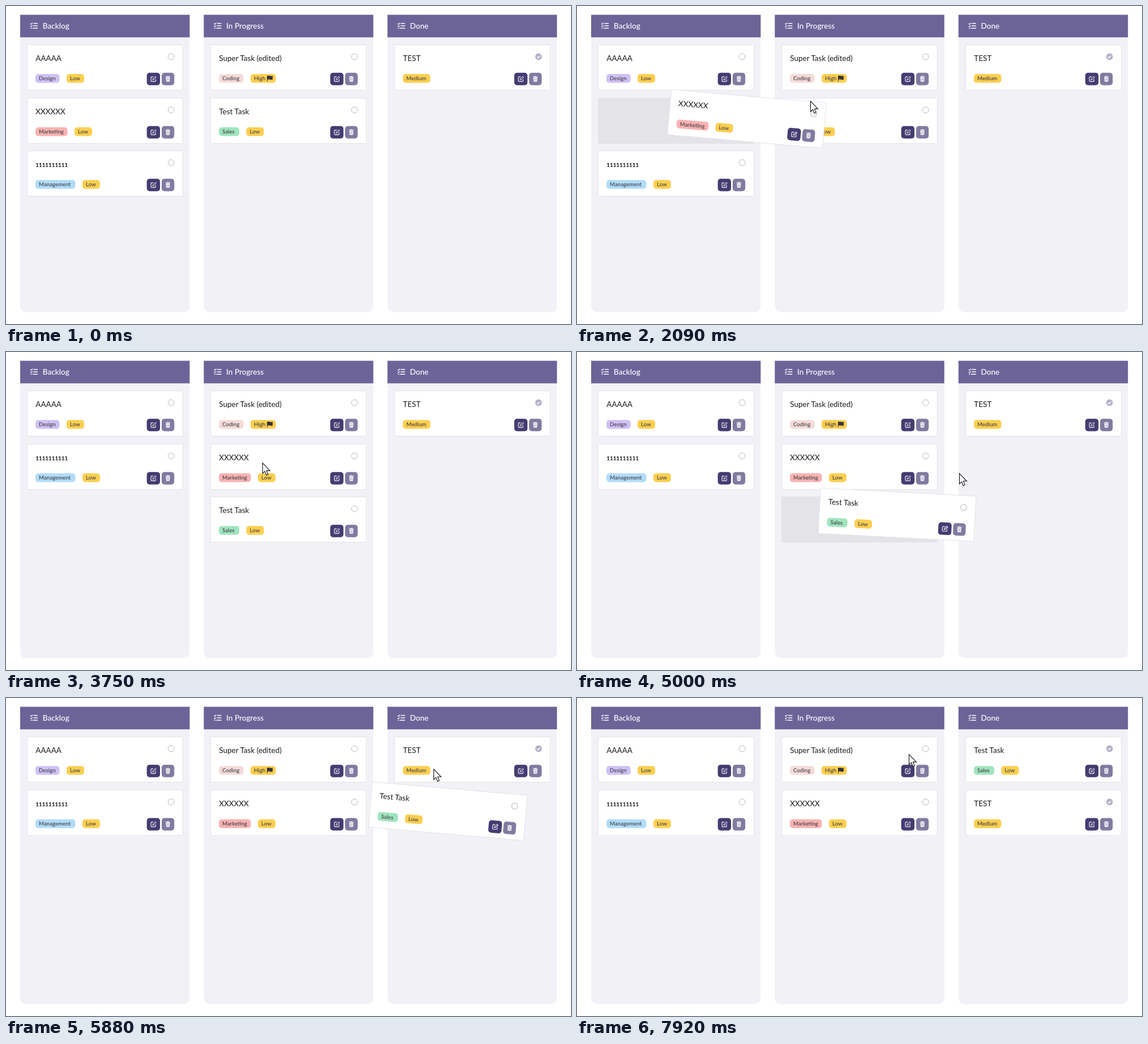
These frames come from a looping animation (998x561 px, 8000 ms). An HTML page:

```html
<!DOCTYPE html>
<html lang="en">
<head>
<meta charset="utf-8">
<title>Task board</title>
<style>
  html, body { margin: 0; width: 100%; height: 100%; overflow: hidden; background: #fff; }
  svg { display: block; width: 100%; height: 100%; font-family: Lato, "Open Sans", sans-serif; }
  .heading { font-size: 13.6px; font-weight: 500; fill: #fff; }
  .title { font-size: 13.5px; fill: #1a1a1a; }
  .digits { font-size: 9.8px; font-weight: 700; fill: #111; }
  .tag { font-size: 9.7px; font-weight: 600; fill: #4b484c; }
</style>
</head>
<body>
<svg viewBox="0 0 998 561">
  <defs>
    <g id="list" fill="none" stroke="#fff" stroke-width="1.5">
      <path d="M.5 2l1.3 1.3L4.5.5M.5 6.4l1.3 1.3L4.5 4.9" stroke-width="1.2"/>
      <path d="M6 1.8h7.5M6 6h7.5M4.5 10.2h9M1 10.2h2"/>
    </g>
    <g id="edit">
      <rect width="23.4" height="22" rx="5" fill="#443d72"/>
      <path d="M11.3 7.2H8.6q-1.2 0-1.2 1.2v5.8q0 1.2 1.2 1.2h5.8q1.2 0 1.2-1.2v-2.6" fill="none" stroke="#fff" stroke-width="1.1"/>
      <path d="M10.4 12.6l.4-2 4.2-4.2 1.6 1.6-4.2 4.2z" fill="none" stroke="#fff"/>
    </g>
    <g id="trash">
      <rect width="22.2" height="22" rx="5" fill="#827aa0"/>
      <path d="M7 6.5h2.4l.6-.8h2l.6.8H15v1.3H7zM7.5 8.5h7l-.4 6.3q-.1 1-1.1 1H9q-1 0-1.1-1z" fill="#fff"/>
      <path d="M9.5 9.9v4.5M11 9.9v4.5M12.5 9.9v4.5" stroke="#827aa0" stroke-width=".6"/>
    </g>
    <circle id="open" r="5.4" fill="#fff" stroke="#b9b7bd"/>
    <g id="done">
      <circle r="5.8" fill="#b4afc9"/>
      <path d="M-2.7.2l1.9 1.9 3.5-3.7" fill="none" stroke="#fff" stroke-width="1.5"/>
    </g>
  </defs>
  <g id="columns"></g>
  <rect id="gap" width="276" height="81" rx="2" fill="#e4e4e8"/>
  <g id="cards"></g>
  <path id="cursor" d="M.5.5V18.8L4.5 15 7.2 21.8 10.2 20.5 7.5 13.9H13.4Z" fill="#fff" stroke="#111" stroke-width="1.1"/>
</svg>
<script>
const LOOP = 8000, SLIDE = 250, LAG = 150, TILT = 4.9, DONE_COLUMN = 2, PITCH = 324.4;
const get = id => document.getElementById(id);
const clamp = p => Math.min(1, Math.max(0, p));
const ease = p => clamp(p) ** 2 * (3 - 2 * clamp(p));
const mix = (a, b, p) => a + (b - a) * p;
const slot = (column, row) => [Math.round(37 + PITCH * column), Math.round(68 + 93.5 * row)];

get('columns').innerHTML = ['Backlog', 'In Progress', 'Done'].map((name, c) => `
  <g transform="translate(${25 + PITCH * c} 15.5)">
    <path d="M0 0H299.4V512.5q0 12-12 12H12q-12 0-12-12z" fill="#f2f1f6"/>
    <rect width="299.4" height="39.8" fill="#6c6499"/>
    <use href="#list" x="17.5" y="13.5"/>
    <text class="heading" x="39.7" y="24.5">${name}</text>
  </g>`).join('');

// label: [fill, width]
const TAGS = {
  Design: ['#cfc0f6', 42.5], Marketing: ['#f9b2b2', 56.5], Management: ['#b0dcfb', 70.5],
  Coding: ['#f5dbd8', 43.5], Sales: ['#a0e5be', 36],
  Low: ['#fccf50', 31], Medium: ['#fccf50', 48.5], High: ['#fccf50', 44.5]
};
const FLAG = '<path d="M29.5 3v10M30 3.7q2.4-.9 4.6 0t4 0v5.6q-2 .9-4.2 0t-4.4 0z" fill="#37343a" stroke="#37343a"/>';

function tagRow(labels) {
  let x = 15;
  return labels.map(label => {
    const [fill, width] = TAGS[label];
    const left = x;
    x += width + 12.5;
    return `<g transform="translate(${left} 52)">
      <rect width="${width}" height="15.5" rx="5" fill="${fill}"/>
      <text class="tag" x="6" y="11.3">${label}</text>${label === 'High' ? FLAG : ''}</g>`;
  }).join('');
}

function makeCard(column, row, title, ...labels) {
  const node = document.createElementNS('http://www.w3.org/2000/svg', 'g');
  node.innerHTML = `
    <rect x=".5" y=".5" width="275" height="80" rx="2" fill="#fff" stroke="#e3e2e8"/>
    <text class="${/^\d/.test(title) ? 'digits' : 'title'}" x="15.3" y="28.5">${title}</text>
    <use class="mark" x="254.7" y="21.4"/>
    ${tagRow(labels)}
    <use href="#edit" x="211.7" y="49.7"/><use href="#trash" x="238" y="49.7"/>`;
  get('cards').append(node);
  return { node, column, row, mark: node.querySelector('.mark') };
}

const marketing = makeCard(0, 1, 'XXXXXX', 'Marketing', 'Low');
const sales = makeCard(1, 1, 'Test Task', 'Sales', 'Low');
const cards = [
  marketing, sales,
  makeCard(0, 0, 'AAAAA', 'Design', 'Low'),
  makeCard(0, 2, '1111111111', 'Management', 'Low'),
  makeCard(1, 0, 'Super Task (edited)', 'Coding', 'High'),
  makeCard(2, 0, 'TEST', 'Medium')
];

// Pointer strokes: [start, duration, x, y]; between them the pointer rests
const STROKES = [
  [1000, 450, 203, 175], [1630, 625, 455, 165], [3420, 710, 450, 266],
  [4742, 322, 700, 205], [5442, 600, 767, 98], [7670, 250, 586, 99]
];

// Each drag leaves one list and enters another, [column, row] each
const DRAGS = [
  { card: marketing, from: [0, 1], to: [1, 1], grab: [203, 175], lift: 1780, leave: 2300, enter: 2300, drop: 2750 },
  { card: sales, from: [1, 2], to: [2, 0], grab: [450, 266], lift: 4850, leave: 5200, enter: 6350, drop: 7670 }
];

// Every stroke bows slightly: the vertical part comes late
function pointerAt(t) {
  let x = 335, y = 262;
  for (const [start, duration, toX, toY] of STROKES) {
    const p = ease((t - start) / duration);
    x = mix(x, toX, p);
    y = mix(y, toY, p ** 1.5);
  }
  return [x, y];
}

// The held card trails the pointer, then glides into its new slot
function heldPose({ from, to, grab, lift, drop }, t) {
  const home = slot(...from), goal = slot(...to);
  const pointer = pointerAt(Math.min(t, drop) - LAG);
  const landing = ease((t - drop) / SLIDE);
  const [x, y] = home.map((v, i) => mix(v + pointer[i] - grab[i], goal[i], landing));
  return { x, y, angle: TILT * clamp((t - lift) / SLIDE) * (1 - landing) };
}

function poseOf(card, t) {
  let { column, row } = card;
  for (const drag of DRAGS) {
    const { from, to, lift, leave, enter, drop } = drag;
    if (drag.card === card) {
      if (t >= lift && t < drop + SLIDE) {
        return { ...heldPose(drag, t), held: true, column: t > drop + SLIDE * .8 ? to[0] : column };
      }
      if (t >= drop) [column, row] = to;
    } else if (column === from[0] && row > from[1]) {
      row -= ease((t - leave) / SLIDE);
    } else if (column === to[0] && row >= to[1]) {
      row += ease((t - enter) / SLIDE);
    }
  }
  const [x, y] = slot(column, row);
  return { x, y, angle: 0, column };
}

function gapAt(t) {
  for (const { from, to, lift, leave, enter, drop } of DRAGS) {
    if (t >= lift && t < leave) return from;
    if (t >= enter && t < drop + SLIDE) return to;
  }
}

function show(id, place) {
  get(id).style.display = place ? '' : 'none';
  if (place) get(id).setAttribute('transform', `translate(${place})`);
}

function draw(t) {
  for (const card of cards) {
    const { x, y, angle, held, column } = poseOf(card, t);
    card.node.setAttribute('transform', `translate(${x} ${y}) rotate(${angle} 138 40.5)`);
    card.mark.setAttribute('href', column === DONE_COLUMN ? '#done' : '#open');
    if (held && get('cards').lastChild !== card.node) get('cards').append(card.node);
  }
  const gap = gapAt(t);
  show('gap', gap && slot(...gap));
  show('cursor', t >= STROKES[0][0] && pointerAt(t));
}

const begin = performance.now();
function frame() {
  draw((performance.now() - begin) % LOOP);
  requestAnimationFrame(frame);
}
frame();
</script>
</body>
</html>
```
